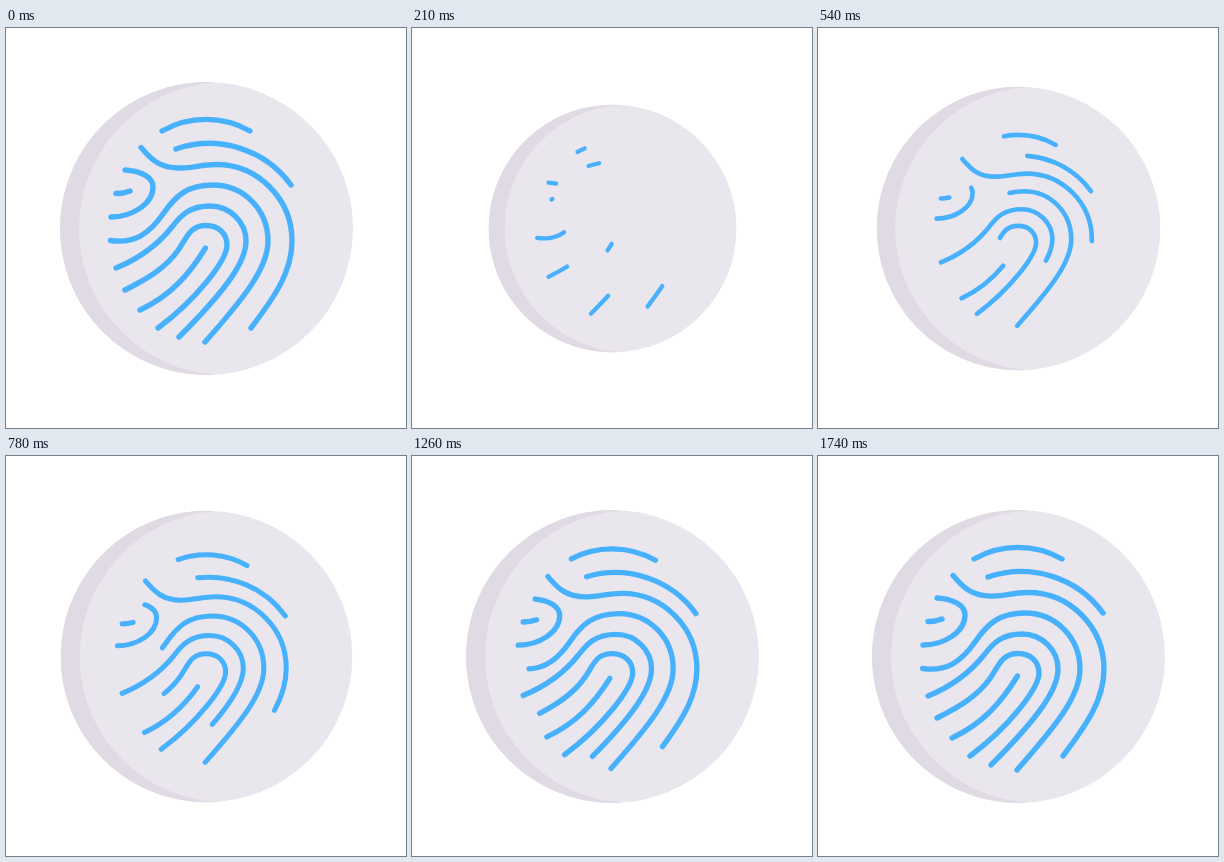
These frames come from a looping animation (400 px wide and 400 px high, 4.8 s). An HTML page with a canvas:

```html
<!DOCTYPE html>
<html lang="en">
<head>
<meta charset="utf-8">
<title>Fingerprint</title>
<style>
  html, body { margin: 0; width: 100%; height: 100%; overflow: hidden; background: #fff; }
  canvas { display: block; width: 400px; height: 400px; }
</style>
</head>
<body>
<canvas id="stage"></canvas>
<script>
const SIZE = 400, LOOP = 4800, STEP = 30, START = 30;
const MID = 200.5, RADIUS = 146.5, SHIFT = 19;
const LIGHT = '#eae6ed', DARK = '#dfdae3', BLUE = '#48b1fd';

const canvas = document.getElementById('stage');
const ctx = canvas.getContext('2d');
const ratio = window.devicePixelRatio || 1;
canvas.width = canvas.height = SIZE * ratio;

// Ridges erase towards their first point and regrow from their last; flipped ones do the reverse.
function ridge(d, flip = false) {
  const el = document.createElementNS('http://www.w3.org/2000/svg', 'path');
  el.setAttribute('d', d);
  return { path: new Path2D(d), length: el.getTotalLength(), flip };
}

const ridges = [
  ridge('M156 103C183 87.5 217 87.5 244 103'),
  ridge('M170 121C212 106.5 259 121 285 157'),
  ridge('M135 119.5C144 130 153 141 176 140C188 139.5 197 136.5 210 136.5C252 136.5 286 171 286 213C286 243 270 267 245 300', true),
  ridge('M104.5 212.5C128 216 143 206 157 186C170 167 182 157 207 157C238 157 262 182 262 213C262 240 238 270 199 314'),
  ridge('M110 240C132 231 150 219 166 199C175 187 184 178 204 178C224 178 240 194 240 213C240 233 222 260 173 309', true),
  ridge('M119 262C141 251 160 240 173 221C181 209 184 197.5 200 197.5C213 197.5 221 206 221 217C221 232 191 271 152 300'),
  ridge('M199.5 220C184 245 166 267 134 282'),
  ridge('M105 189C126 189 147 176 147 159C147 149 135 143 119 142', true),
  ridge('M110 165.5Q118 165.5 124 163', true)
];

const decay = k => x => (Math.exp(-k * x) - Math.exp(-k)) / (1 - Math.exp(-k));

function snapBack(x) {
  const u = 1 - Math.cbrt(x);
  return u ** 3 + 3 * u * u * (1 - u) * 0.74;
}

// Goes 0 -> 1 until the turn, then back to 0 at the end.
function swing(t, turn, end, power, back) {
  if (t <= START || t >= end) return 0;
  if (t < turn) return 1 - (1 - (t - START) / (turn - START)) ** power;
  return back((t - turn) / (end - turn));
}

const discBack = decay(5.5), printBack = decay(4.2);
const TURN = 270, END = 1770;

function scaled(scale, draw) {
  ctx.save();
  ctx.translate(MID, MID);
  ctx.scale(scale, scale);
  ctx.translate(-MID, -MID);
  draw();
  ctx.restore();
}

function circle(x, color) {
  ctx.beginPath();
  ctx.arc(x, MID, RADIUS, 0, Math.PI * 2);
  ctx.fillStyle = color;
  ctx.fill();
}

function drawDisc() {
  circle(MID, LIGHT);
  // The crescent is the disc minus a copy moved to the right.
  const meet = Math.acos(SHIFT / 2 / RADIUS);
  ctx.beginPath();
  ctx.arc(MID, MID, RADIUS, meet, Math.PI * 2 - meet);
  ctx.arc(MID + SHIFT, MID, RADIUS, Math.PI + meet, Math.PI - meet, true);
  ctx.closePath();
  ctx.fillStyle = DARK;
  ctx.fill();
}

function drawPrint(t) {
  const shown = 1 - swing(t, TURN, END, 1.6, snapBack);
  if (shown < 0.004) return;
  ctx.strokeStyle = BLUE;
  ctx.lineWidth = 5.4;
  ctx.lineCap = ctx.lineJoin = 'round';
  for (const { path, length, flip } of ridges) {
    const fromEnd = (t >= TURN) !== flip;
    if (shown < 1) {
      ctx.setLineDash([shown * length, 2 * length]);
      ctx.lineDashOffset = fromEnd ? (shown - 1) * length : 0;
    }
    ctx.stroke(path);
  }
}

function render(t) {
  ctx.setTransform(ratio, 0, 0, ratio, 0, 0);
  ctx.fillStyle = '#fff';
  ctx.fillRect(0, 0, SIZE, SIZE);
  scaled(1 - 0.165 * swing(t, 330, 1050, 3, discBack), drawDisc);
  scaled(1 - 0.24 * swing(t, 370, END, 3, printBack), () => drawPrint(t));
}

const origin = performance.now();

function tick() {
  const t = (performance.now() - origin) % LOOP;
  render(Math.floor(t / STEP) * STEP);
  requestAnimationFrame(tick);
}
tick();
</script>
</body>
</html>
```
